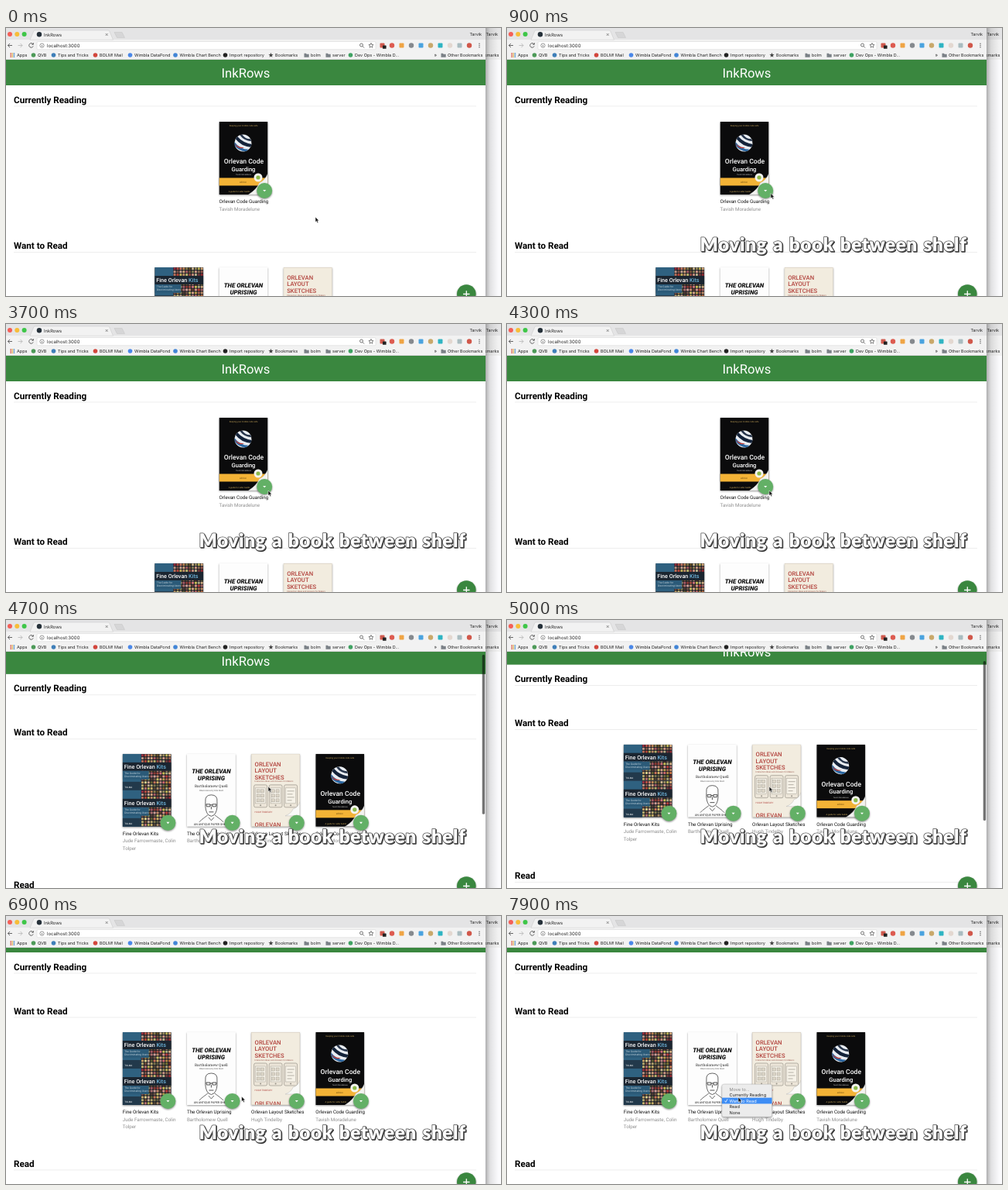
An HTML page that plays this animation: 640 px wide and 346 px high, repeating every 8 s.

```html
<!DOCTYPE html>
<html lang="en">
<head>
<meta charset="utf-8">
<title>InkRows</title>
<style>
html, body { margin: 0; width: 100%; height: 100%; overflow: hidden; background: #fff; }
svg { display: block; }
#stage { width: 100vw; height: 100vh; }
text { font-family: Roboto, sans-serif; white-space: pre; text-rendering: geometricPrecision; }
.ui { font-family: Inter, sans-serif; }
.lift { filter: drop-shadow(0 1px 1.2px #0007); }
#caption {
  font: 900 24.3px Lato, sans-serif; letter-spacing: .6px; word-spacing: 1.5px;
  paint-order: stroke; stroke: #5a5a5a; stroke-width: 1.6px; stroke-linejoin: round;
  filter: drop-shadow(1.2px 1.4px .5px #333);
}
</style>
</head>
<body>
<svg id="stage" viewBox="0 0 640 346"></svg>
<script>
const LOOP = 8000, SCROLL = 27, PITCH = 83.2;
const GREEN = '#3a873f';

const text = (x, y, s, size, fill = '#222', extra = '') =>
  `<text x="${x}" y="${y}" font-size="${size}" fill="${fill}" ${extra}>${s}</text>`;
const ui = (x, y, s, size = 5.5, fill = '#222') => text(x, y, s, size, fill, 'class="ui"');
const mid = (x, y, s, size, fill, extra = '') => text(x, y, s, size, fill, 'text-anchor="middle" ' + extra);
const rect = (x, y, w, h, fill, extra = '') =>
  `<rect x="${x}" y="${y}" width="${w}" height="${h}" fill="${fill}" ${extra}/>`;
const dot = (x, y, r, fill, extra = '') => `<circle cx="${x}" cy="${y}" r="${r}" fill="${fill}" ${extra}/>`;
const path = (d, fill = 'none', stroke = 'none', width = 1, extra = '') =>
  `<path d="${d}" fill="${fill}" stroke="${stroke}" stroke-width="${width}" ${extra}/>`;
const group = (id, body, extra = '') => `<g id="${id}" ${extra}>${body}</g>`;
const at = (x, y, body) => `<g transform="translate(${x} ${y})">${body}</g>`;
const times = (n, fn) => Array.from({ length: n }, (_, i) => fn(i)).join('');

let seed = 7;
const random = () => (seed = seed * 16807 % 2147483647) / 2147483647;

// ---- Book covers, each 63 x 94 ----
function securityCover() {
  const globe = dot(0, 0, 11, '#e9edf2') +
    path('M-10.5 -4 Q0 0 10.5 -4 L11 0 Q0 5 -11 0Z', '#14233a') +
    path('M-10.3 4 Q0 9 10.3 4 L8 8 Q0 12 -8 8Z', '#2a66a0') +
    path('M-6 -9 Q0 -6 6 -9 L8.5 -7 Q0 -3 -8.5 -7Z', '#27354b') +
    path('M-9 6 Q-1 8 4 4 Q-1 11 -9 6', '#c23a34');
  const white = 'font-weight="500"';
  return rect(0, 0, 63, 94, '#0b0b0c') +
    mid(31.5, 6, 'Keeping your mobile code safe', 2.7, '#c9a75a') +
    `<g transform="translate(31 27.5) rotate(28)">${globe}</g>` +
    mid(32, 54, 'Orlevan Code', 8.6, '#fff', white) +
    mid(31.5, 63.7, 'Guarding', 7.6, '#fff', white) +
    mid(31.5, 69, 'Tavish Moradelune', 2.4, '#ccc') +
    rect(0, 72.5, 63, 10, '#f3b336') +
    mid(31, 78.5, 'edition', 3, '#6b4a10') +
    mid(26, 91, 'A guide for safer builds', 2.7, '#c9a75a') +
    path('M63 67 V94 H38 Q49 87 52 79 Q59 76 63 67', '#f3f3f1', '#bbb', .4) +
    dot(50.5, 72, 5.5, '#f4f4ee') + dot(50.5, 72, 2.6, '#8cba4c');
}

function kitsCover() {
  const tile = i => {
    const x = i % 10 * 3.9 + 24.3, y = Math.floor(i / 10) * 3.9 + .3;
    return rect(x, y, 3, 3, `hsl(${random() * 70 - 10} ${20 + random() * 35}% ${25 + random() * 45}%)`, 'rx=".7"');
  };
  const half = rect(0, 0, 63, 47, '#1d2128') + rect(0, 0, 24, 47, '#2f6180') + times(120, tile) +
    rect(0, 11, 63, 11, '#1b2530') + rect(0, 22, 34, 11, '#2b5a78') +
    text(2, 19.4, 'Fine Orlevan <tspan fill="#6fb6dd">Kits</tspan>', 7.2, '#fff', 'font-weight="500"') +
    text(2.5, 26, 'The Guide for', 3.4, '#c3d4de') +
    text(2.5, 30, 'Discriminating Users', 3.4, '#c3d4de') +
    rect(0, 36, 24, 11, '#22394b') + text(2.5, 44, 'TOLMA', 3, '#fff');
  return half + at(0, 47, half);
}

function uprisingCover() {
  const heavy = 'font-weight="900" font-style="italic"';
  const serif = 'style="font-family:Noto Serif,serif"';
  return rect(0, 0, 63, 94, '#fdfdfd') +
    mid(31.5, 25.5, 'THE ORLEVAN', 7.9, '#111', heavy) +
    mid(31.5, 34.5, 'UPRISING', 7.9, '#111', heavy) +
    mid(31.5, 43.5, 'Bartholomew Quell', 4.6, '#222', serif) +
    mid(31.5, 48, 'Illustrations by Odo Marl', 2.6, '#555', serif) +
    path('M24 62 Q23 53 31.5 53 Q40 53 39 62 Q40 74 35 79 Q31.5 82 28 79 Q23 74 24 62', '#fff', '#222', .7) +
    path('M25 65 h5 v3 h-4.5z M33 65 h5 l-.5 3 h-4.5z M30 66 h3 M31.5 68 v3.5 M28.5 75 h6', 'none', '#222', .8) +
    path('M27 79 L19 85 L16 88 M36 79 L44 85 L47 88 M28 82 l3.5 4 3.5-4', 'none', '#333', .7) +
    mid(31.5, 92, 'AN ANTIQUE PAPER SHELF', 3.7, '#222');
}

function sketchCover() {
  const red = '#b2433d', bold = 'font-weight="500"';
  const title = ['ORLEVAN', 'LAYOUT', 'SKETCHES'].map((s, i) => text(4.5, 15.7 + i * 8.5, s, 7.7, red, bold)).join('');
  const phone = i => at(3.5 + i * 19.5, 40,
    rect(0, 0, 17, 29, '#ece5d8', 'rx="2" stroke="#8a867c" stroke-width=".6"') +
    rect(2, 4, 13, 20, '#f6f2e8', 'stroke="#a5a197" stroke-width=".5"') +
    (i < 2 ? times(6, k => rect(3.5 + k % 2 * 5.5, 6 + (k >> 1) * 6, 4, 4, '#dcd5c7', 'stroke="#98948a" stroke-width=".4"'))
           : path('M4 8h9 M4 12h7 M4 16h9 M4 20h6', 'none', '#98948a', .7)) +
    dot(8.5, 26.5, 1, '#98948a'));
  return rect(0, 0, 63, 94, '#f2ecdf') + title +
    text(4.5, 36.5, 'Interaction Ideas and Answers for Makers', 2.7, '#9a5a50') +
    times(3, phone) + text(4.5, 76, 'HUGH TINDELBY', 3, red) +
    path('M63 62 V80 H44 Q52 77 54 71 Q60 70 63 62', '#fafaf8', '#aaa', .4) +
    text(4.5, 94.5, 'ORLEVAN', 7.7, red, bold) +
    rect(.25, .25, 62.5, 93.5, 'none', 'stroke="#d3cabb" stroke-width=".5"');
}

const books = [
  { cover: kitsCover, title: 'Fine Orlevan Kits', by: ['Jude Farrowmaste, Colin', 'Tolper'] },
  { cover: uprisingCover, title: 'The Orlevan Uprising', by: ['Bartholomew Quell'] },
  { cover: sketchCover, title: 'Orlevan Layout Sketches', by: ['Hugh Tindelby'] },
  { cover: securityCover, title: 'Orlevan Code Guarding', by: ['Tavish Moradelune'] },
];

const bookView = (b, i) => group('book' + i,
  `<g style="filter:drop-shadow(.5px 1px 1px #0006)"><svg width="63" height="94">${b.cover()}</svg></g>` +
  dot(58.7, 89, 10, '#63b066', 'class="lift"') + path('M56.7 88 h4 l-2 2.3z', '#fff') +
  text(0, 105.2, b.title, 6.25, '#111') +
  b.by.map((s, k) => text(0, 114.5 + k * 9.6, s, 6.25, '#8e8e8e')).join(''));

const shelf = (id, name) => group(id,
  text(10, 4.5, name, 11.7, '#000', 'font-weight="700"') + rect(10, 8.6, 598, .7, '#e6e6e6'));

// ---- Browser window ----
const folder = x => path(`M${x - 3} 32.8 h2.4 l.8 .9 h3 v4 h-6.2z`, '#7b8187');
const star = (x, y, fill, stroke = 'none') =>
  path('M' + times(10, k => {
    const r = k % 2 ? 1.4 : 3.3, a = k * Math.PI / 5;
    return `${(x + r * Math.sin(a)).toFixed(1)} ${(y - r * Math.cos(a)).toFixed(1)} `;
  }) + 'Z', fill, stroke, .7);
const bookmarks = [
  [41, 'QVB', '#4d9a58'], [67, 'Tips and Tricks', '#3f7fb9'], [121, 'BOLM! Mail', '#d2463c'],
  [166, 'Wimbla DataPond', '#4a87e8'], [224.5, 'Wimbla Chart Bench', '#4285d6'],
  [289, 'Import repository', '#222'], [348, 'Bookmarks', 'star'], [394, 'bolm', 'folder'],
  [422, 'server', 'folder'], [451, 'Dev Ops - Wimbla D...', '#3fa262'], [571, 'Other Bookmarks', 'folder'],
];
const extensions = ['#cf5a4e', '#dd5b50', '#efa444', '#85898e', '#4aa3df', '#c9a86a', '#2fb4c2', '#e3d8d0', '#a9bcc0', '#d0574a'];

function bookmark([x, name, icon]) {
  const mark = icon === 'star' ? star(x - 5.5, 35, '#444') : icon === 'folder' ? folder(x - 5.5)
    : dot(x - 5.5, 35, 2.8, icon);
  return mark + ui(x, 37, name);
}

function browser() {
  return rect(0, 0, 620, 15, '#e4e4e5') + rect(0, 15, 620, 26, '#f2f2f2') + rect(0, 40.4, 620, .6, '#c4c4c4') +
    ['#f45f57', '#f7bd38', '#3ec648'].map((c, i) => dot(5 + i * 9.3, 8, 3, c)).join('') +
    path('M31 15.2 L36 3.6 Q36.5 3 37.5 3 H132 Q133 3 133.5 3.6 L138.5 15.2Z', '#f2f2f2', '#bcbcbc', .4) +
    path('M140 5.5 h10 l3.5 7 h-10z', '#d6d6d7', '#bdbdbd', .4) +
    dot(43, 8.3, 3.2, '#253039') + ui(49, 10.5, 'InkRows', 5.8) +
    path('M128.7 7 l3 3 m0 -3 l-3 3', 'none', '#666', .7) +
    ui(599.5, 9.5, 'Tarvik', 5.4) +
    rect(40, 17.5, 438, 10.3, '#fff', 'rx="1.5" stroke="#d0d0d0" stroke-width=".5"') +
    path('M8 22.5 h-5.5 m2.5 -2.6 l-2.6 2.6 2.6 2.6', 'none', '#555', .9) +
    path('M15.5 22.5 h5.5 m-2.5 -2.6 l2.6 2.6 -2.6 2.6', 'none', '#bbb', .9) +
    path('M35 21 a2.8 2.8 0 1 0 .2 2.4 M35.4 19.2 v2 h-2.1', 'none', '#555', .9) +
    dot(46.5, 22.6, 2.6, 'none', 'stroke="#666" stroke-width=".7"') + rect(46.1, 22, .8, 2, '#666') +
    ui(53, 24.8, 'localhost:3000', 6) +
    dot(459.5, 22, 2, 'none', 'stroke="#555" stroke-width=".8"') + path('M461 23.5 l2 2', 'none', '#555', .9) +
    star(472, 22.6, 'none', '#555') +
    extensions.map((c, i) => i % 2 ? dot(486.5 + i * 12.5, 22.5, 3.2, c) : rect(483.5 + i * 12.5, 19.5, 6, 6, c, 'rx="1"')).join('') +
    rect(487, 22.6, 4.6, 4.2, '#222', 'rx=".6"') +
    times(3, i => dot(612, 20.2 + i * 2.3, .7, '#555')) +
    times(9, i => rect(5.5 + i % 3 * 2.1, 32.2 + Math.floor(i / 3) * 2.1, 1.5, 1.5, ['#d8574b', '#e3a83b', '#4a8fd0'][i % 3])) +
    ui(14, 37, 'Apps') + bookmarks.map(bookmark).join('') + ui(553.5, 37, '»', 6);
}

const backWindow = rect(619, 0, 21, 15, '#e4e4e5') + rect(619, 15, 21, 26, '#f2f2f2') +
  rect(619, 41, 21, 305, '#fbfbfd') + rect(620, 0, 17, 346, 'url(#shade)') +
  ui(620.5, 9.5, 'Tarvik', 5.4) + ui(618.5, 37, 'kmarks');

// ---- Dropdown ----
const options = ['Move to...', 'Currently Reading', 'Want to Read', 'Read', 'None'];
const menu = rect(0, 0, 64.5, 42, '#ececec', 'rx="2.5" stroke="#bdbdbd" stroke-width=".4" class="lift"') +
  rect(0, 0, 64.5, 7.8, '#3d8df5', 'id="bar"') +
  options.map((s, i) => text(9.5, 8.4 + i * 7.5, s, 5.6, '#222', `class="ui" id="opt${i}"`)).join('') +
  path('M3.5 0 l1.3 1.8 2.2 -4', 'none', '#fff', .8, 'id="check"');

const $ = id => document.getElementById(id);
$('stage').innerHTML =
  `<defs><linearGradient id="shade"><stop stop-color="#777" stop-opacity=".6"/>
   <stop offset=".35" stop-color="#999" stop-opacity=".27"/><stop offset="1" stop-color="#aaa" stop-opacity="0"/></linearGradient>
   <clipPath id="view"><rect y="41" width="620" height="305"/></clipPath></defs>` +
  rect(0, 0, 640, 346, '#fff') + backWindow +
  `<g clip-path="url(#view)">` +
    group('page', rect(0, 41, 620, 33, GREEN) + mid(310, 63.6, 'InkRows', 16.6, '#fff') +
      shelf('current', 'Currently Reading') + shelf('want', 'Want to Read') + shelf('read', 'Read') +
      books.map(bookView).join('')) +
    dot(595.3, 343.5, 12.3, GREEN, 'class="lift"') + path('M595.3 339.3 v8.4 M591.1 343.5 h8.4', 'none', '#fff', 1.3) +
    rect(615.7, 0, 3.4, 206, '#000', 'rx="1.7" id="thumb"') +
  `</g>` + browser() +
  group('menu', menu) +
  mid(422, 288, 'Moving a book between shelf', 24.3, '#fff', 'id="caption"') +
  dot(0, 0, 9.7, 'none', 'id="ring" stroke="#222" stroke-width="1.3"') +
  group('cursor', path('M0 0 V6.6 L1.5 5.3 L2.6 7.7 L3.8 7.1 L2.7 4.8 H4.7Z', '#111', '#fff', .5));

// ---- Motion ----
const cursorKeys = [
  [0, 400, 244], [200, 400, 244], [850, 341, 213.5], [2050, 341, 213.5], [2250, 338, 211],
  [2650, 338, 211], [3000, 339, 215], [6100, 339, 215], [7200, 297, 237], [7600, 297, 237],
  [7850, 299, 234], [8000, 299, 234],
];
const clicks = [[2200, 2500], [3200, 3450], [7400, 7650]];

const ramp = (t, a, b) => {
  const p = Math.min(1, Math.max(0, (t - a) / (b - a)));
  return p * p * (3 - 2 * p);
};
const place = (id, x, y) => $(id).setAttribute('transform', `translate(${x} ${y})`);
const show = (id, on) => $(id).setAttribute('visibility', on ? 'visible' : 'hidden');

function cursorAt(t) {
  const i = cursorKeys.findIndex(k => k[0] > t);
  const [t0, x0, y0] = cursorKeys[i - 1], [t1, x1, y1] = cursorKeys[i];
  const p = ramp(t, t0, t1);
  return [x0 + (x1 - x0) * p, y0 + (y1 - y0) * p];
}

function drawMenu(t) {
  const first = t >= 2280 && t < 3450, second = t >= 7580;
  const row = first && t < 2800 ? 1 : 2, chosen = first ? 1 : 2;
  $('menu').setAttribute('display', first || second ? 'inline' : 'none');
  place('menu', second ? 278 : 320, second ? 217.2 : 195.2);
  $('bar').setAttribute('y', 2.4 + row * 7.5);
  options.forEach((_, i) => $('opt' + i).setAttribute('fill', i === row ? '#fff' : i ? '#222' : '#888'));
  place('check', 0, 6.4 + chosen * 7.5);
  $('check').setAttribute('stroke', row === chosen ? '#fff' : '#222');
}

function draw(t) {
  const moved = t >= 4350, scroll = SCROLL * ramp(t, 4470, 5400);
  place('page', 0, -scroll);
  place('thumb', 0, 42 + scroll * .68);
  $('thumb').setAttribute('opacity', .55 * (ramp(t, 4450, 4550) - ramp(t, 5450, 5750)));
  place('current', 0, 92);
  place('want', 0, moved ? 149 : 280.5);
  place('read', 0, moved ? 346 : 478);
  books.forEach((_, i) => {
    if (moved) place('book' + i, 150.7 + i * PITCH, 177);
    else if (i === 3) place('book3', 275.5, 121);
    else place('book' + i, 192.3 + i * PITCH, 309);
  });
  drawMenu(t);
  $('caption').setAttribute('opacity', ramp(t, 400, 700));
  const [x, y] = cursorAt(t);
  place('cursor', x, y);
  place('ring', x, y + .8);
  show('ring', clicks.some(([a, b]) => t >= a && t < b));
}

const start = performance.now();
function frame() {
  draw((performance.now() - start) % LOOP);
  requestAnimationFrame(frame);
}
frame();
</script>
</body>
</html>
```
